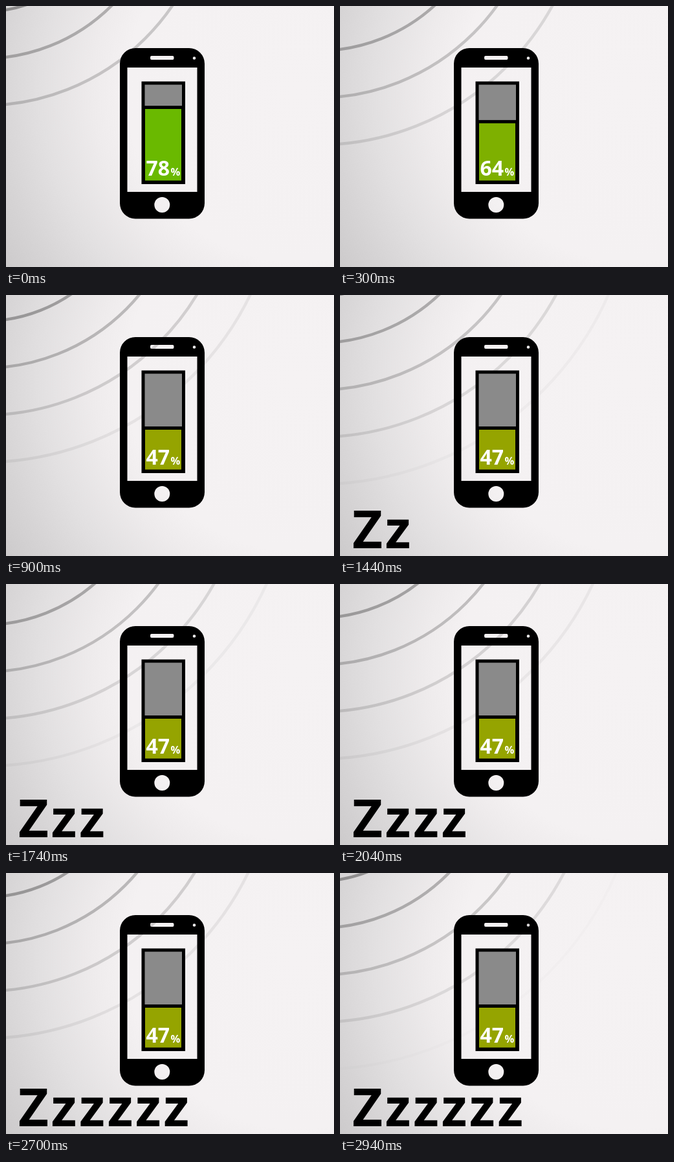
Animation of 507 by 403 pixels, one loop 3000 ms. Source, as an HTML page with a canvas:

```html
<!DOCTYPE html>
<html>
<head>
<meta charset="utf-8">
<style>
  html, body { margin: 0; width: 100%; height: 100%; overflow: hidden; }
  canvas { display: block; }
</style>
</head>
<body>
<canvas id="stage" width="507" height="403"></canvas>
<script>
const ctx = document.getElementById('stage').getContext('2d');
const LOOP = 3000, STEP = 60;
const FONT = '"Open Sans", "Noto Sans", sans-serif';
const CENTER = { x: -35, y: -200 }, RING_GAP = 73, RING_END = 314;
// Time and distance of the first wave: a nearly steady speed
const WAVE = [[0, 152], [600, 274], [900, 330], [1440, 437], [2040, 561], [2400, 632], [2940, 740]];

const backdrop = ctx.createRadialGradient(450, 130, 0, 450, 130, 530);
[[0, '#f5f2f3'], [.5, '#f4f1f2'], [.6, '#eeebec'], [.75, '#e2e0e1'], [.88, '#d6d4d5'], [1, '#cccacb']]
  .forEach(([at, color]) => backdrop.addColorStop(at, color));

// Body with see-through screen, speaker, camera and button
const phone = new Path2D();
phone.roundRect(176, 65, 131, 263.5, 24);
phone.rect(187.5, 95, 108, 192);
phone.roundRect(223, 77, 36.5, 6, 2);
const hole = (x, y, r) => { phone.moveTo(x + r, y); phone.arc(x, y, r, 0, 7); };
hole(291, 80.5, 2.3);
hole(241.3, 307, 12);

function box(color, x, y, w, h) {
  ctx.fillStyle = color;
  ctx.fillRect(x, y, w, h);
}

function label(text, x, y, size, color, spacing = 0) {
  ctx.font = `bold ${size}px ${FONT}`;
  ctx.letterSpacing = spacing + 'px';
  ctx.fillStyle = color;
  ctx.fillText(text, x, y);
}

function waveFront(t) {
  let i = 1;
  while (i < WAVE.length - 1 && t > WAVE[i][0]) i++;
  const [t0, y0] = WAVE[i - 1], [t1, y1] = WAVE[i];
  return y0 + (y1 - y0) * (t - t0) / (t1 - t0);
}

function drawRings(t) {
  ctx.lineWidth = 4.5;
  for (let y = waveFront(t); y > -15; y -= RING_GAP) {
    if (y > RING_END) continue;
    ctx.strokeStyle = `rgba(0,0,0,${.35 * (1 - y / RING_END)})`;
    ctx.beginPath();
    ctx.arc(CENTER.x, CENTER.y, Math.hypot(CENTER.x, y - CENTER.y), 0, 7);
    ctx.stroke();
  }
}

function drawBattery(t) {
  const level = Math.max(47, 78 - 28 * t / 600);
  const used = 78 - level, top = 154 + used * 1.58;
  box('#000', 209.5, 116.5, 67.5, 158.5);
  box('#8a8a8a', 214.5, 121.5, 57.5, top - 121.5);
  box(`rgb(${106 + used * 1.4},${185 - used * .67},0)`, 215, top + 5, 56, 264.5 - top);
  label(Math.round(level), 216.5, 262, 32, '#fff');
  label('%', 254.5, 261.5, 16.5, '#fff');
}

function draw(t) {
  box(backdrop, 0, 0, 507, 403);
  drawRings(t);
  ctx.fillStyle = '#000';
  ctx.fill(phone, 'evenodd');
  drawBattery(t);
  const letters = Math.floor((t - 1000) / 340) + 1;
  if (letters > 0) label('Z' + 'z'.repeat(letters - 1), 19, 391, 81, '#000', 3.9);
}

function tick() {
  draw(Math.floor(performance.now() % LOOP / STEP) * STEP);
  requestAnimationFrame(tick);
}
tick();
</script>
</body>
</html>
```
